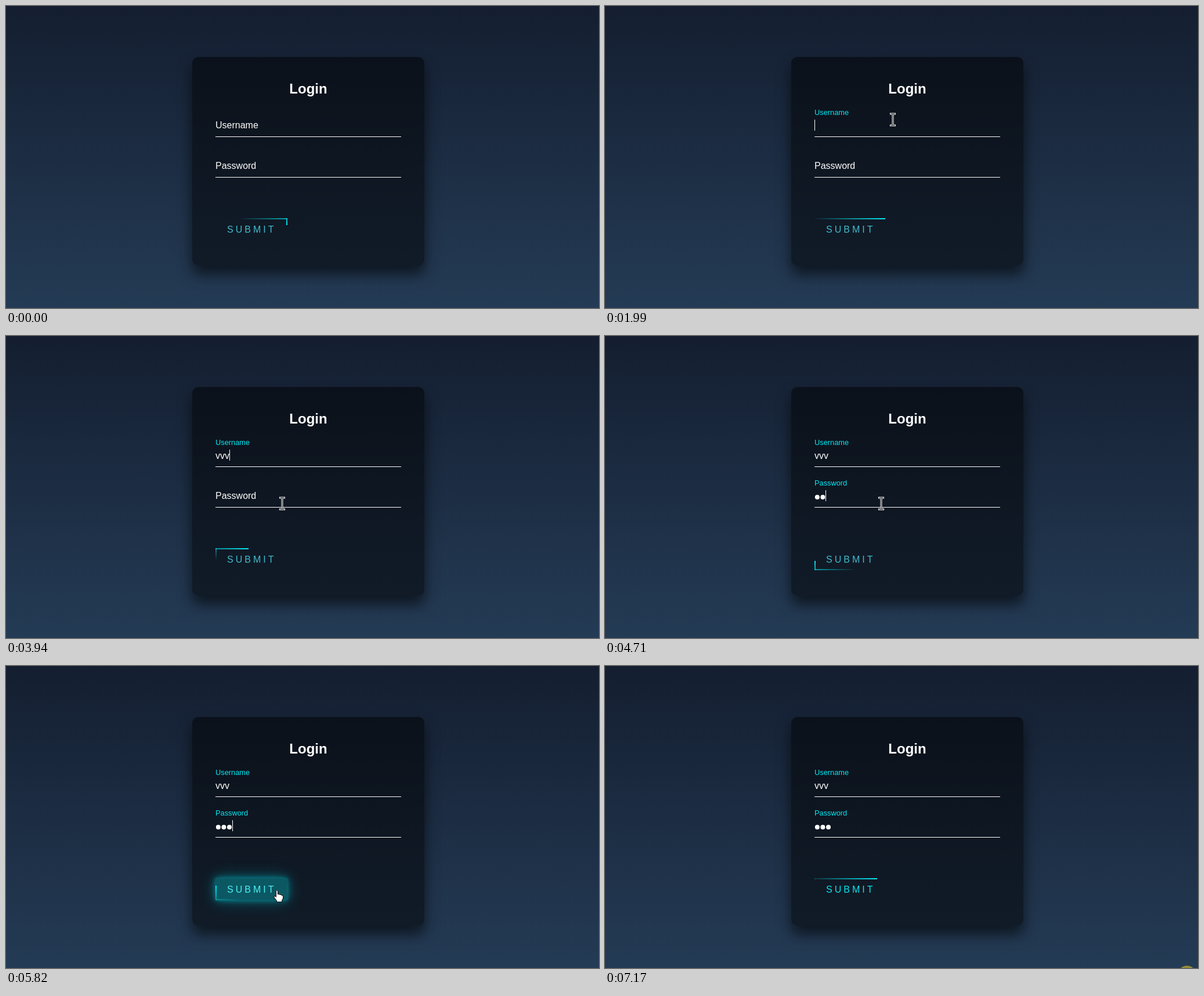
Animation of 1022x521 px, one loop 7240 ms. Source, as an HTML page:

```html
<!DOCTYPE html>
<html lang="en">
<head>
<meta charset="utf-8">
<title>Login</title>
<style>
html, body { margin: 0; width: 100%; height: 100%; overflow: hidden; }
body { background: linear-gradient(#141e30, #243b55); }
.card, .btn, svg { position: absolute; }
.card {
  left: 321px; top: 88px; width: 400px; height: 360px; border-radius: 10px;
  background: rgba(0, 0, 0, .5); box-shadow: 0 15px 25px rgba(0, 0, 0, .6);
}
.btn { left: 361px; top: 366px; width: 124px; height: 38px; overflow: hidden; }
.btn i { position: absolute; width: 124px; height: 2px; background: linear-gradient(90deg, transparent, #03e9f4); }
.btn i:nth-child(2) { right: 0; width: 2px; height: 38px; background: linear-gradient(transparent, #03e9f4); }
.btn i:nth-child(3) { bottom: 0; background: linear-gradient(270deg, transparent, #03e9f4); }
.btn i:nth-child(4) { left: 0; width: 2px; height: 38px; background: linear-gradient(0deg, transparent, #03e9f4); }
svg { left: 0; top: 0; }
text { font: 16px "Liberation Sans", Arial, sans-serif; fill: #fff; white-space: pre; }
</style>
</head>
<body>
<div class="card"></div>
<div class="btn" id="btn"><i></i><i></i><i></i><i></i></div>
<svg width="1022" height="521">
  <text x="521" y="151" text-anchor="middle" style="font-size:24px;font-weight:bold">Login</text>
  <path d="M361 225.5h320M361 295.5h320" stroke="#fff"/>
  <text x="361" id="userLabel">Username</text>
  <text x="361" id="passLabel">Password</text>
  <text x="361" y="212" id="typed"></text>
  <g id="dots" fill="#fff">
    <circle cx="365.8" cy="278" r="4"/><circle cx="375.4" cy="278" r="4"/><circle cx="385" cy="278" r="4"/>
  </g>
  <rect id="caret" width="1" height="19" fill="#fff"/>
  <text x="381" y="391" id="submit" style="letter-spacing:4px">SUBMIT</text>
  <circle id="click" cx="1003" cy="533" r="16" fill="#948b36"/>
  <g id="pointer">
    <path id="arrow" d="M.5 .5V21.500L5.300 17 9.200 26 12.500 24.500 8.700 15.800H15Z" fill="#000" stroke="#fff" stroke-width="1.200"/>
    <g id="beam" fill="none">
      <path d="M-5 -10H5M-5 10H5M0 -10V10" stroke="#fff" stroke-width="3"/>
      <path d="M-4 -10H4M-4 10H4M0 -10V10" stroke="#000"/>
    </g>
    <path id="hand" d="M-1.500 1Q0 -1.500 1.500 1V7Q3.500 5.500 4.700 7.500 6.700 6.500 7.700 8.500 10 8 10.500 10.500V14L8.500 17.500V20H-.5V18L-5 12Q-5.500 9 -3 10L-1.500 11.500Z" fill="#fff" stroke="#000"/>
  </g>
</svg>
<script>
const $ = id => document.getElementById(id);
const LOOP = 7240, FADE = 520;
const USER = 1480, PASS = 3960, HOVER = 5710, LEAVE = 6160;
const userKeys = [2400, 2560, 2720], passKeys = [4520, 4640, 4750];
const groups = [0, 800, 1570, 2350, 3110, 3870, 4640, 5400, 6160, 6890, LOOP];
const route = [
  [70, 927, 502], [400, 755, 488], [730, 549, 304], [950, 496, 196],
  [3600, 496, 196], [3800, 472, 238], [3920, 476, 289], [4800, 476, 289],
  [5330, 602, 393], [5450, 615, 394], [5710, 485, 388], [5790, 467, 387],
  [6090, 467, 387], [6160, 490, 383], [6306, 783, 352], [6600, 930, 400],
  [6820, 991, 478], [6960, 1003, 533]
];
const bars = [...$("btn").children], edges = ["left", "top", "right", "bottom"];

const clamp = x => Math.min(1, Math.max(0, x));
const mix = (a, b, k) => a + (b - a) * k;
const blend = (a, b, k) => `rgb(${a.map((v, i) => Math.round(mix(v, b[i], k)))})`;
const show = (id, on) => $(id).style.display = on ? "" : "none";
const WHITE = [255, 255, 255], CYAN = [3, 233, 244], DULL = [64, 188, 207];

// The CSS "ease" curve, solved by bisection
function ease(x) {
  x = clamp(x);
  const curve = (s, a, b) => 3 * s * (1 - s) ** 2 * a + 3 * s * s * (1 - s) * b + s ** 3;
  let lo = 0, hi = 1;
  for (let i = 0; i < 20; i++) {
    const mid = (lo + hi) / 2;
    if (curve(mid, .25, .25) < x) lo = mid; else hi = mid;
  }
  return x === 1 ? 1 : curve(lo, .1, 1);
}

// Hold each picture for about 70 ms
function step(t) {
  const g = groups.findLastIndex(s => s <= t);
  const span = groups[g + 1] - groups[g], count = Math.round(span / 70);
  const n = Math.floor((t - groups[g] + 8) * count / span);
  return groups[g] + Math.min(n, count - 1) * span / count;
}

function label(id, y, start, t) {
  const k = ease((t - start) / FADE), el = $(id);
  el.setAttribute("y", mix(y, y - 23, k));
  el.style.fontSize = mix(16, 12.8, k) + "px";
  el.style.fill = blend(WHITE, CYAN, k);
}

function drawFields(t) {
  label("userLabel", 211, USER, t);
  label("passLabel", 281, PASS, t);
  const pressed = keys => keys.filter(k => k <= t).length;
  const chars = pressed(userKeys), dots = pressed(passKeys);
  $("typed").textContent = "v".repeat(chars);
  [...$("dots").children].forEach((d, i) => d.style.display = i < dots ? "" : "none");

  const inPass = t >= PASS;
  const last = [USER, ...userKeys, PASS, ...passKeys].findLast(k => k <= t);
  show("caret", t >= USER && t < LEAVE - 60 && Math.floor((t - last) / 520) % 2 === 0);
  $("caret").setAttribute("x", Math.round(361 + (inPass ? dots * 9.6 : chars * 8)));
  $("caret").setAttribute("y", inPass ? 266 : 196);
}

function drawButton(t) {
  bars.forEach((bar, i) => {
    const p = (.33 + t * .0009605 - i / 4 + 1) % 1;
    bar.style[edges[i]] = Math.min(1, 4 * p - 1) * (i % 2 ? 38 : 124) + "px";
  });
  const h = ease((t - HOVER) / FADE) * (1 - ease((t - LEAVE) / FADE));
  const glow = `rgba(${CYAN},${h})`, s = $("btn").style;
  s.background = glow;
  s.borderRadius = 5 * h + "px";
  s.boxShadow = h ? [5, 25, 50, 100].map(r => `0 0 ${r * h}px ${glow}`).join() : "none";
  $("submit").style.fill = blend(t < HOVER ? DULL : CYAN, WHITE, h);
}

function drawPointer(t) {
  const i = route.findLastIndex(r => r[0] <= t);
  const on = i >= 0 && i < route.length - 1;
  show("pointer", on);
  show("click", t >= 7090);
  if (!on) return;
  const [a, b] = [route[i], route[i + 1]], k = (t - a[0]) / (b[0] - a[0]);
  const x = Math.round(mix(a[1], b[1], k)), y = Math.round(mix(a[2], b[2], k));
  const inside = (l, top, r, bottom) => x >= l && x <= r && y >= top && y <= bottom;
  const beam = inside(361, 186, 681, 226) || inside(361, 256, 681, 296);
  const hand = inside(361, 366, 485, 404);
  show("beam", beam);
  show("hand", hand);
  show("arrow", !beam && !hand);
  $("pointer").setAttribute("transform", `translate(${x} ${y})`);
}

function draw() {
  const t = step(performance.now() % LOOP);
  drawFields(t);
  drawButton(t);
  drawPointer(t);
  requestAnimationFrame(draw);
}
draw();
</script>
</body>
</html>
```
